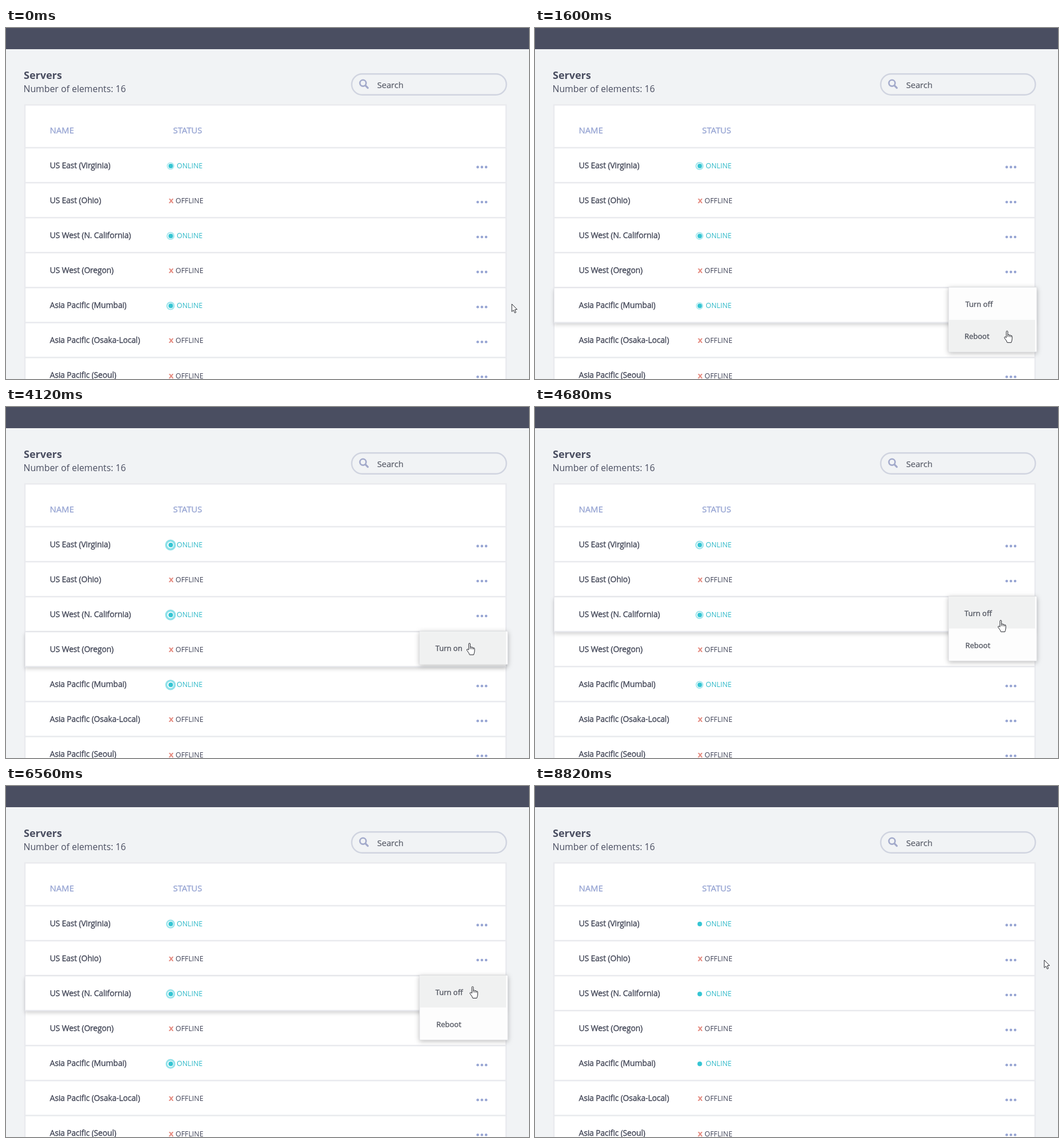
Animation of 913x613 px, one loop 8870 ms. Source, as an HTML page:

```html
<!DOCTYPE html>
<html lang="en">
<head>
<meta charset="utf-8">
<title>Servers</title>
<style>
  html, body { margin: 0; width: 100%; height: 100%; overflow: hidden; background: #f1f3f5; }
  svg { display: block; position: absolute; left: 0; top: 0; }
  text { font-family: "Open Sans", "Noto Sans", sans-serif; fill: #42465a; }
  .title { font-size: 18px; font-weight: 700; fill: #4a4e61; }
  .count { font-size: 15.8px; fill: #4a4e61; }
  .search { font-size: 14.6px; fill: #565a66; stroke: #565a66; stroke-width: .2px; }
  .head { font-size: 14.8px; fill: #97a5d3; stroke: #97a5d3; stroke-width: .35px; }
  .name { font-size: 14px; letter-spacing: -.2px; fill: #3f4354; stroke: #3f4354; stroke-width: .3px; }
  .status { font-size: 12.4px; }
  .online { fill: #2fb9c8; }
  .cross { font-size: 15px; font-weight: 700; fill: #e58b80; }
  .item { font-size: 13px; fill: #50545f; stroke: #50545f; stroke-width: .35px; }
  .raised { filter: drop-shadow(0 3px 3px rgba(0, 0, 0, .17)); }
  .menu { filter: drop-shadow(0 2px 4px rgba(0, 0, 0, .26)); }
</style>
</head>
<body>
<svg id="stage" width="913" height="613" viewBox="0 0 913 613"></svg>
<script>
const LOOP = 8870, TOP = 209, PITCH = 61.07, ITEM = 56.5;
const PEAK = 700, HALF_BEAT = 1580;
const stage = document.getElementById('stage');

const rows = [
  ['US East (Virginia)', true],
  ['US East (Ohio)', false],
  ['US West (N. California)', true],
  ['US West (Oregon)', false],
  ['Asia Pacific (Mumbai)', true],
  ['Asia Pacific (Osaka-Local)', false],
  ['Asia Pacific (Seoul)', false]
];

// The pointer climbs from row 4 to row 1; each menu closes as the next one opens.
const switches = [950, 3250, 4480, 6850, 8250];
const visits = [4, 3, 2, 1].map((row, k) => ({ row, open: switches[k], close: switches[k + 1] }));

// time, x, y of the pointer's resting points
const stops = [
  [210, 883, 482], [1100, 837, 488], [1620, 824, 529], [4060, 809, 413],
  [4930, 814, 362], [5560, 814, 400], [7480, 815, 306], [8600, 889, 304]
];

const clamp = v => Math.max(0, Math.min(1, v));
const ease = f => f * f * (3 - 2 * f);
const lineY = i => TOP + PITCH * i;
const fade = (t, open, close, span) => clamp((t - open) / span) * clamp(1 - (t - close) / span);

function add(parent, tag, attrs, text) {
  const el = document.createElementNS('http://www.w3.org/2000/svg', tag);
  for (const key in attrs) el.setAttribute(key, attrs[key]);
  if (text) el.textContent = text;
  parent.appendChild(el);
  return el;
}
const rect = (p, x, y, width, height, fill, more) => add(p, 'rect', { x, y, width, height, fill, ...more });
const label = (p, cls, x, y, text) => add(p, 'text', { class: cls, x, y }, text);

// page frame
rect(stage, 0, 0, 913, 613, '#f1f3f5');
rect(stage, 0, 0, 913, 37, '#4a4e61');
label(stage, 'title', 31, 88.5, 'Servers');
label(stage, 'count', 30.5, 112, 'Number of elements: 16');
rect(stage, 603.5, 80.2, 270, 36.6, '#f1f3f5', { rx: 18.3, stroke: '#d0d4e0', 'stroke-width': 2.4 });
add(stage, 'circle', { cx: 623.2, cy: 96.2, r: 5.4, fill: 'none', stroke: '#a3aacb', 'stroke-width': 2.6 });
add(stage, 'path', { d: 'M627.4 100.4L631.6 104.6', stroke: '#a3aacb', 'stroke-width': 3.2, 'stroke-linecap': 'round' });
label(stage, 'search', 648, 104.6, 'Search');

// table
rect(stage, 33, 134.3, 840, 520, '#fff', { stroke: '#e9eaee', 'stroke-width': 2.4 });
label(stage, 'head', 76.5, 183.7, 'NAME');
label(stage, 'head', 291.8, 183.7, 'STATUS');
rows.forEach((_, i) => rect(stage, 33, lineY(i) - 1.2, 840, 2.5, '#e9eaee'));

const raised = visits.map(({ row }) => {
  const y = lineY(row) + 1.3;
  const g = add(stage, 'g', { class: 'raised', opacity: 0 });
  rect(g, 33, y, 840, PITCH, '#e9eaee');
  rect(g, 34, y, 838, PITCH - 2.5, '#fff');
  return g;
});

const halos = [];
rows.forEach(([name, online], i) => {
  const y = lineY(i);
  label(stage, 'name', 76.5, y + 35.5, name);
  if (online) {
    const cy = y + 32;
    halos.push({ el: add(stage, 'circle', { cx: 287.2, cy, fill: 'none', stroke: '#2ec6d6' }), lag: 160 - i * 40 });
    add(stage, 'circle', { cx: 287.6, cy, r: 4, fill: '#35c5d3' });
    label(stage, 'status online', 298, y + 36.1, 'ONLINE');
  } else {
    label(stage, 'cross', 284, y + 36.1, 'x');
    label(stage, 'status', 296, y + 36.1, 'OFFLINE');
  }
  for (let k = 0; k < 3; k++)
    add(stage, 'circle', { cx: 823.5 + 7.3 * k, cy: y + 33.9, r: 2.3, fill: '#97a5d3' });
});

// menus
const menus = visits.map(({ row }) => {
  const names = rows[row][1] ? ['Turn off', 'Reboot'] : ['Turn on'];
  const top = lineY(row) - .5, size = names.length > 1 ? ITEM : 58;
  const g = add(stage, 'g', { class: 'menu', opacity: 0 });
  rect(g, 722, top, 154, size * names.length, '#fdfdfd', { stroke: '#dcdde0', 'stroke-width': .8 });
  const items = names.map((name, k) => ({
    back: rect(g, 722.5, top + k * size + .4, 150.5, size - .8, '#f0f1f1'),
    text: label(g, 'item', 751, top + k * size + 34.2, name)
  }));
  return { g, items, top, split: top + size };
});

// pointer
const ink = { fill: '#fff', stroke: '#26282e', 'stroke-width': 1, 'stroke-linejoin': 'round' };
const arrow = add(stage, 'path', { d: 'M0 0V13.4L3 10.7L5.2 15.6L7.3 14.6L5.2 9.9L9.2 9.5Z', ...ink });
const hand = add(stage, 'path', {
  d: 'M-1.3 12V1.5Q-1.3 .3 0 .3Q1.3 .3 1.3 1.5V7Q3.5 6 4.1 7.6Q6.1 6.8 6.7 8.4Q8.9 8 8.9 10V14Q8.7 17 7.3 20.5H.3' +
     'Q-.5 17.5 -4.1 13.2Q-5.3 11.4 -4.1 10.7Q-2.9 10.2 -1.3 12ZM1.3 7V10.5M4.1 7.6V10.8M6.7 8.4V11', ...ink
});

function pointerAt(t) {
  let i = 0;
  while (i < stops.length - 2 && t >= stops[i + 1][0]) i++;
  const [t0, x0, y0] = stops[i], [t1, x1, y1] = stops[i + 1];
  const f = ease(clamp((t - t0) / (t1 - t0)));
  return [x0 + (x1 - x0) * f, y0 + (y1 - y0) * f];
}

function drawHalos(t) {
  for (const { el, lag } of halos) {
    const k = (1 + Math.cos(Math.PI * (t - lag - PEAK) / HALF_BEAT)) / 2;
    const outer = 4.2 + 5.3 * k, inner = 4.2 + 1.6 * k;
    el.setAttribute('r', (outer + inner) / 2);
    el.setAttribute('stroke-width', outer - inner);
    el.setAttribute('stroke-opacity', .35 + .2 * k);
  }
}

function draw(t) {
  drawHalos(t);
  const [x, y] = pointerAt(t);
  let over = false;

  visits.forEach(({ open, close }, i) => {
    const { g, items, top, split } = menus[i];
    g.setAttribute('opacity', fade(t, open, close, 90));
    raised[i].setAttribute('opacity', fade(t, open - 100, close, 150));
    if (t >= open && t < close && x < 873 && y >= top) over = true;
    const current = items.length > 1 && y > split ? 1 : 0;
    items.forEach(({ back, text }, k) => {
      back.setAttribute('opacity', k === current ? 1 : 0);
      text.setAttribute('x', k === current ? 749.7 : 751.2);
    });
  });

  arrow.style.display = over ? 'none' : '';
  hand.style.display = over ? '' : 'none';
  (over ? hand : arrow).setAttribute('transform', `translate(${x} ${y})`);
}

const start = performance.now();
function tick() {
  draw((performance.now() - start) % LOOP);
  requestAnimationFrame(tick);
}
tick();
</script>
</body>
</html>
```
